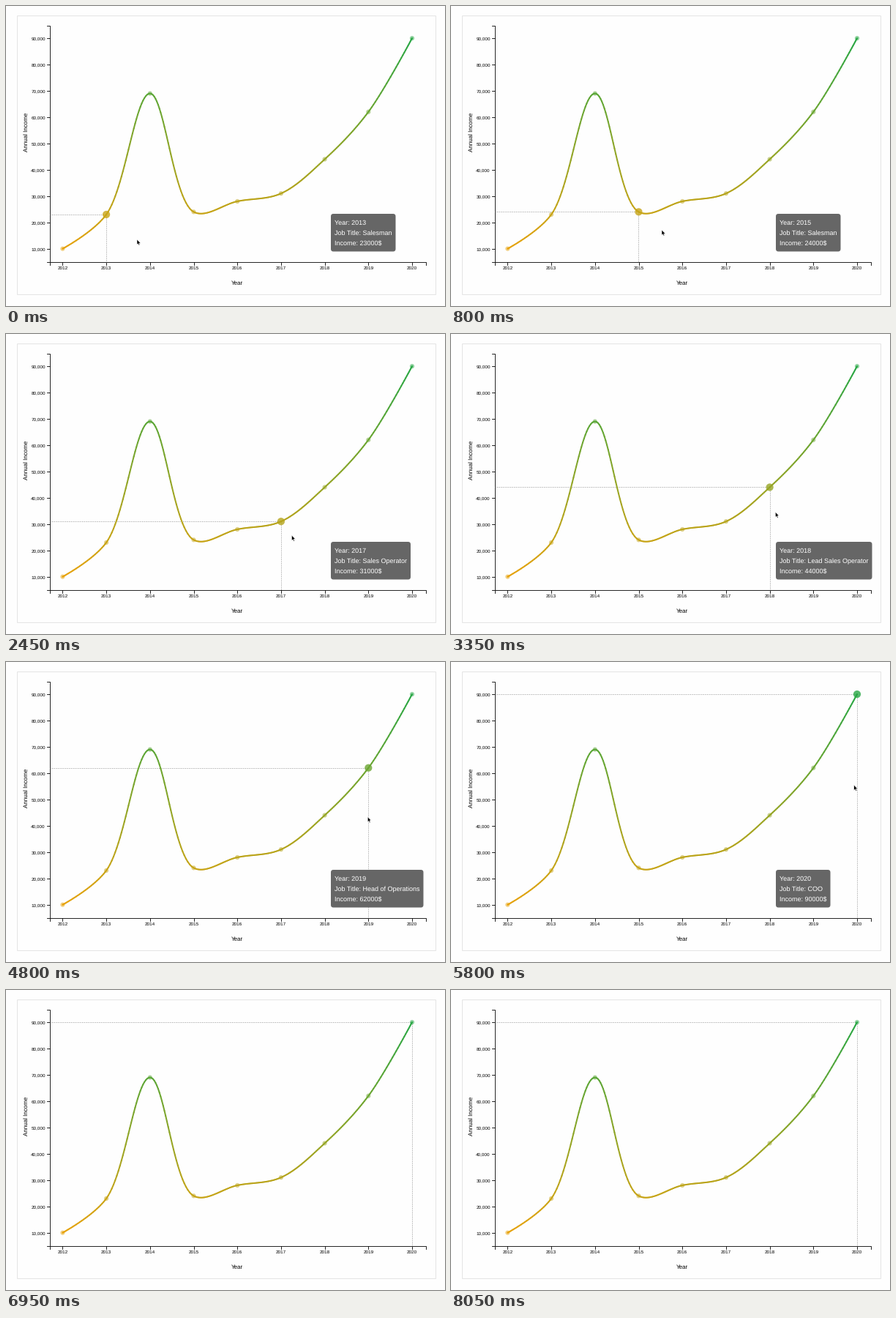
A matplotlib script for the animation above (8.1 s loop, 600 px wide and 410 px high).

```python
import numpy as np
import matplotlib.pyplot as plt
from matplotlib.animation import FuncAnimation
from matplotlib.collections import LineCollection
from matplotlib.patches import Circle, FancyBboxPatch, Polygon, Rectangle

W, H, DPI = 600, 410, 80
STEP, FRAMES = 50, 162
PX = 72 / DPI
EASE_MS = 250

YEARS = range(2012, 2021)
INCOME = [10000, 23000, 69000, 24000, 28000, 31000, 44000, 62000, 90000]
JOBS = ["Salesman", "Salesman", "Sales Operator", "Salesman", "Salesman",
        "Sales Operator", "Lead Sales Operator", "Head of Operations", "COO"]

# (start ms, point index, hovered)
STOPS = [(-1000, 1, True), (20, 2, True), (555, 3, True), (1080, 4, True),
         (1260, 5, True), (2560, 6, True), (4480, 7, True), (5365, 8, True),
         (6490, 8, False)]

# pointer path: ms, x, y
PATH = np.array([
    (0, 179, 319), (100, 187, 318), (300, 222, 314), (450, 236, 312),
    (550, 236, 312), (650, 254, 310), (800, 288, 306), (900, 295, 305),
    (1050, 296, 305), (1100, 301, 304), (1200, 304, 303), (1300, 350, 294),
    (1550, 358, 291), (1850, 359, 290), (2300, 362, 288), (2600, 419, 262),
    (3100, 440, 246), (3550, 446, 241), (3850, 455, 235), (4200, 462, 231),
    (4500, 480, 222), (4900, 499, 208), (5250, 521, 191), (5350, 530, 184),
    (5400, 538, 177), (5500, 541, 174.5), (5900, 554, 166), (6050, 559, 163),
    (6450, 601, 150), (6500, 620, 146)])


def sx(year):
    return 77.4 + 59.7 * (year - 2012)


def sy(income):
    return 331.7 - 35.96 * (income - 10000) / 10000


PTS = np.array([(sx(y), sy(v)) for y, v in zip(YEARS, INCOME)])


def tint(y):
    k = np.clip((332 - y) / 288, 0, 1)
    low, high = np.array([232, 163, 12]), np.array([40, 167, 69])
    return tuple((low + (high - low) * k) / 255)


def catmull_rom(p, n=30):
    """Centripetal Catmull-Rom through all points."""
    d = np.sqrt(np.hypot(*np.diff(p, axis=0).T))
    t = np.linspace(0, 1, n, endpoint=False)[:, None]
    out = []
    for i in range(len(p) - 1):
        a, b = p[i], p[i + 1]
        c1, c2 = a, b
        if i > 0:
            c1 = a + slope(p, d, i) * d[i] / 3
        if i < len(p) - 2:
            c2 = b - slope(p, d, i + 1) * d[i] / 3
        u = 1 - t
        out.append(u**3 * a + 3 * u * u * t * c1 + 3 * u * t * t * c2 + t**3 * b)
    return np.vstack(out + [p[-1:]])


def slope(p, d, i):
    return ((p[i] - p[i - 1]) / d[i - 1]
            - (p[i + 1] - p[i - 1]) / (d[i - 1] + d[i])
            + (p[i + 1] - p[i]) / d[i])


def ease(k):
    k = min(max(k, 0), 1)
    return 4 * k**3 if k < 0.5 else 1 - 4 * (1 - k)**3


def state(t):
    """Crosshair position, growth of each point, active index, hover flag."""
    pos, grow = PTS[1], np.zeros(len(PTS))
    ends = [s[0] for s in STOPS[1:]] + [1e9]
    for (start, i, on), end in zip(STOPS, ends):
        if t < start:
            break
        k = ease((min(t, end) - start) / EASE_MS)
        pos = pos + (PTS[i] - pos) * k
        grow = grow + (np.eye(len(PTS))[i] * on - grow) * k
        idx, hover = i, on
    return pos, grow, idx, hover


plt.rcParams["font.family"] = "Liberation Sans"
plt.rcParams["text.hinting"] = "none"

fig = plt.figure(figsize=(W / DPI, H / DPI), dpi=DPI, facecolor="#fefefe")
ax = fig.add_axes([0, 0, 1, 1])
ax.set_xlim(0, W)
ax.set_ylim(H, 0)
ax.axis("off")


def line(xs, ys, color="#111111", width=0.9, **kw):
    return ax.plot(xs, ys, color=color, lw=width * PX, **kw)[0]


def label(x, y, s, size, color="black", **kw):
    return ax.text(x, y, s, fontsize=size * PX, color=color, va="baseline", **kw)


# page frame
ax.add_patch(Rectangle((14.5, 12.5), 572, 381, fill=False, ec="#e4e4e4", lw=PX))
line([0, W], [409.5, 409.5], "#cfcfcf", 1)

# axes
line([55.5, 59.5, 59.5, 55.5], [26.5, 26.5, 350, 350])
line([59.5, 59.5, 573.5, 573.5], [354, 350, 350, 354])
for year in YEARS:
    line([sx(year)] * 2, [350, 354])
    label(sx(year), 360.2, str(year), 6.4, ha="center")
for v in range(10000, 90001, 10000):
    line([55.5, 59.5], [sy(v)] * 2)
    label(53.8, sy(v) + 2.3, f"{v:,}", 6.4, ha="right")
label(316, 381.2, "Year", 8, ha="center")
label(30, 172, "Annual Income", 8, ha="center", rotation=90, rotation_mode="anchor")

# crosshair
dots = dict(color="#999999", width=0.8, linestyle=(0, (1.6, 1.6)),
            dash_capstyle="butt", zorder=2.2)
h_line = line([], [], **dots)
v_line = line([], [], **dots)

# income curve
curve = catmull_rom(PTS)
segs = np.stack([curve[:-1], curve[1:]], axis=1)
ax.add_collection(LineCollection(segs, colors=[tint(s[:, 1].mean()) for s in segs],
                                 lw=2 * PX, capstyle="round", zorder=3))
dots_at = [ax.add_patch(Circle(p, 3, lw=0, zorder=4)) for p in PTS]

# tooltip
tip_box = FancyBboxPatch((447, 287), 80, 45.5, boxstyle="round,pad=3,rounding_size=3.5",
                         fc="#666666", lw=0, zorder=5)
ax.add_patch(tip_box)
tip_rows = [label(449, 299.3 + 13.9 * i, "", 9.05, "white", zorder=6) for i in range(3)]

# pointer
ARROW = np.array([(0, 0), (0, 7.2), (1.6, 5.8), (2.6, 8.2), (3.8, 7.7),
                  (2.8, 5.3), (4.9, 5.2)])
pointer = ax.add_patch(Polygon(ARROW, closed=True, fc="black", ec="white",
                               lw=0.5 * PX, zorder=8))


def show_tip(i):
    rows = (f"Year: {YEARS[i]}", f"Job Title: {JOBS[i]}", f"Income: {INCOME[i]}$")
    right = 0
    for row, s in zip(tip_rows, rows):
        row.set_text(s)
        box = row.get_window_extent().transformed(ax.transData.inverted())
        right = max(right, box.x0, box.x1)
    tip_box.set_width(right + 2 - 447)


def update(n):
    t = n * STEP
    (x, y), grow, idx, hover = state(t)
    h_line.set_data([59.5, x], [y, y])
    v_line.set_data([x, x], [y, 350])
    for dot, p, g in zip(dots_at, PTS, grow):
        dot.set_radius(3.1 + 2 * g)
        dot.set_facecolor(tint(p[1]) + (0.5 + 0.3 * g,))
    for part in (tip_box, *tip_rows):
        part.set_visible(hover)
    if hover:
        show_tip(idx)
    tip = [np.interp(t, PATH[:, 0], PATH[:, k]) for k in (1, 2)]
    pointer.set_xy(ARROW + tip)
    return ()


anim = FuncAnimation(fig, update, frames=FRAMES, interval=STEP,
                     repeat=True, repeat_delay=0, blit=False)
plt.show()
```
